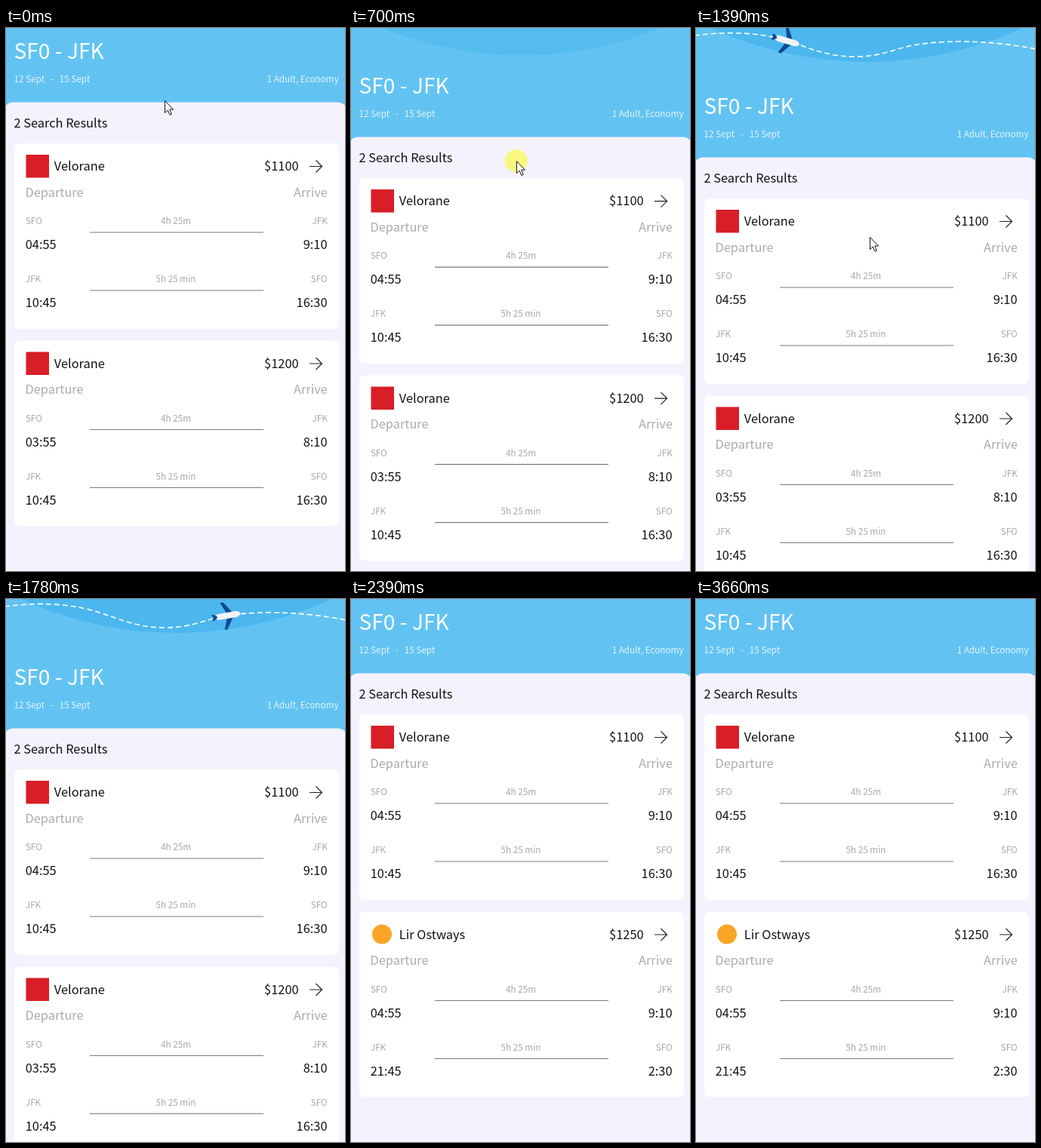
Recreate the animation shown at these times as an HTML page. Size 449x720 px, loop 5200 ms.

```html
<!DOCTYPE html>
<html lang="en">
<head>
<meta charset="utf-8">
<title>Flight search</title>
<style>
  html, body { margin: 0; width: 100%; height: 100%; overflow: hidden; background: #62c3f2; }
  svg { display: block; width: 449px; height: 720px; }
  text {
    font-family: "Noto Sans CJK SC", "Noto Sans CJK JP", "Noto Sans CJK", "Noto Sans", sans-serif;
    font-size: 16.4px; fill: #111; white-space: pre;
  }
  .title { font-size: 28.2px; fill: #fff; }
  .sub { font-size: 11.7px; fill: #e2f4fd; }
  .small { font-size: 11.7px; fill: #a9a9a9; }
  .label { fill: #ababab; }
  .end { text-anchor: end; }
  .mid { text-anchor: middle; }
  .rule { stroke: #7b7b7b; stroke-width: 1.2; }
  .arrow { fill: none; stroke: #222; stroke-width: 1.2; }
</style>
</head>
<body>
<svg viewBox="0 0 449 720">
  <rect width="449" height="720" fill="#62c3f2"/>
  <circle id="blob" cx="226" cy="-449" r="494" fill="#4cb7ef"/>
  <path id="route" fill="none" stroke="#fff" stroke-width="1.6" stroke-dasharray="7 4"
    d="M-2 10C35 5 75 5 110 14C150 25 170 38 210 38C250 38 265 25 300 21C345 15 400 18 451 28"/>
  <g id="plane">
    <path fill="#0d4b94" d="M1-3L-5-18L-1-18L9-3V3L-1 18L-5 18L1 3Z"/>
    <path fill="#f1f3f6" d="M-16-2L-10-4H13Q19-3 19 0Q19 3 13 4H-10L-16 2Z"/>
    <path fill="#0d4b94" d="M-19-4H-16L-12-1V1L-16 4H-19L-17 0Z"/>
  </g>
  <g id="page">
    <text class="title" x="10.5" y="41">SF0 - JFK</text>
    <text class="sub" x="10.6" y="71.5">12 Sept   -   15 Sept</text>
    <text class="sub end" x="440.5" y="71.5">1 Adult, Economy</text>
    <rect x="-4" y="98.5" width="457" height="700" rx="14" fill="#f4f2fd"/>
    <text x="10.4" y="131.5">2 Search Results</text>
    <g id="cards"></g>
  </g>
  <g id="pointer">
    <circle id="press" r="15" fill="#fbf850" opacity=".74"/>
    <path d="M.5 .5V16.5L4.3 13L7 19.2L9.4 18.2L6.8 12H11.6Z" fill="#fff" stroke="#111" stroke-width="1"/>
  </g>
</svg>
<script>
const $ = id => document.getElementById(id);
const LOOP = 5200, TICK = 230 / 3, ORIGIN = 550;

const red = '<rect x="26.5" y="168" width="30.5" height="30.5" fill="#d81e26"/>';
const orange = '<circle cx="41" cy="183" r="13" fill="#f8a526"/>';

const text = (x, y, str, cls = '') => `<text x="${x}" y="${y}" class="${cls}">${str}</text>`;

function leg(y, from, to, span, start, stop) {
  return text(25.9, y, from, 'small') + text(225, y, span, 'small mid') + text(425.8, y, to, 'small end') +
    `<path class="rule" d="M111 ${y + 11}H341"/>` +
    text(25.7, y + 33, start) + text(425.5, y + 33, stop, 'end');
}

function card(id, dy, logo, name, price, out, back) {
  return `<g id="${id}" transform="translate(0 ${dy})">
    <rect x="11" y="153" width="430" height="246" rx="7" fill="#fff"/>${logo}
    ${text(63.8, 189.3, name)}${text(387.6, 189.3, price, 'end')}
    <path class="arrow" d="M402 183.5H418.5M410.5 175.5L418.5 183.5L410.5 191.5"/>
    ${text(25.4, 223.8, 'Departure', 'label')}${text(425.8, 223.8, 'Arrive', 'label end')}
    ${leg(260, 'SFO', 'JFK', '4h 25m', ...out)}
    ${leg(337, 'JFK', 'SFO', '5h 25 min', ...back)}</g>`;
}

$('cards').innerHTML =
  card('first', 0, red, 'Velorane', '$1100', ['04:55', '9:10'], ['10:45', '16:30']) +
  card('before', 261.5, red, 'Velorane', '$1200', ['03:55', '8:10'], ['10:45', '16:30']) +
  card('after', 261.5, orange, 'Lir Ostways', '$1250', ['04:55', '9:10'], ['21:45', '2:30']);

// Tables of [time, value]
const pull = [[473, 0], [550, 12], [627, 29], [703, 46], [780, 59], [857, 68], [930, 73],
  [2083, 73], [2160, 60], [2237, 37.5], [2313, 14], [2390, 0]];
const flight = [[1013, -45], [1090, -20], [1550, 190], [1780, 293], [1857, 338], [1933, 405], [2010, 475]];
const fadeRoute = [[1010, 0], [1090, .5], [1167, 1]];
const handX = [[473, 210], [550, 212], [930, 229], [1010, 230], [1553, 230], [1630, 130], [1707, 27]];
const handY = [[473, 96], [550, 118], [703, 176], [930, 264], [1010, 277]];
const returnX = [[3180, 52], [3650, 182]];

function at(table, t) {
  if (t <= table[0][0]) return table[0][1];
  for (let i = 1; i < table.length; i++) {
    const [t0, a] = table[i - 1], [t1, b] = table[i];
    if (t <= t1) return a + (b - a) * (t - t0) / (t1 - t0);
  }
  return table[table.length - 1][1];
}

const within = (t, a, b) => t >= a && t < b;
const show = (id, on) => $(id).setAttribute('visibility', on ? 'visible' : 'hidden');
const move = (id, x, y, turn = 0) => $(id).setAttribute('transform', `translate(${x} ${y}) rotate(${turn})`);

const route = $('route'), routeLength = route.getTotalLength();

function routeAt(x) {
  let lo = 0, hi = routeLength;
  for (let i = 0; i < 18; i++) {
    const mid = (lo + hi) / 2;
    if (route.getPointAtLength(mid).x < x) lo = mid; else hi = mid;
  }
  const p = route.getPointAtLength(lo - 2), q = route.getPointAtLength(lo + 2);
  return { y: (p.y + q.y) / 2, turn: Math.atan2(q.y - p.y, q.x - p.x) * 180 / Math.PI || 0 };
}

function draw(now) {
  const t = now % LOOP;
  // Motion advances in even ticks, as in a screen recording
  const held = ORIGIN + Math.floor((t - ORIGIN) / TICK + .06) * TICK;

  const drop = at(pull, held);
  move('page', 0, drop);
  move('blob', 0, (drop - 73) / 3);
  $('blob').setAttribute('opacity', Math.max(0, (drop - 12) / 61));

  show('before', held < 2155);
  show('after', held >= 2155);

  show('route', within(held, 1085, 2155));
  route.setAttribute('opacity', at(fadeRoute, held));
  const x = at(flight, held), spot = routeAt(x);
  show('plane', within(held, 1085, 2005));
  move('plane', x, spot.y, spot.turn);

  const back = within(t, 3190, 3650);
  show('pointer', held < 1775 || back);
  show('press', within(t, 320, 1005));
  if (back) {
    const rx = at(returnX, t), k = (rx - 52) / 130;
    move('pointer', rx, 720 - 156 * k * (1 - k));
  } else {
    move('pointer', at(handX, held), at(handY, held));
  }
}

function frame() {
  draw(performance.now());
  requestAnimationFrame(frame);
}
frame();
</script>
</body>
</html>
```
